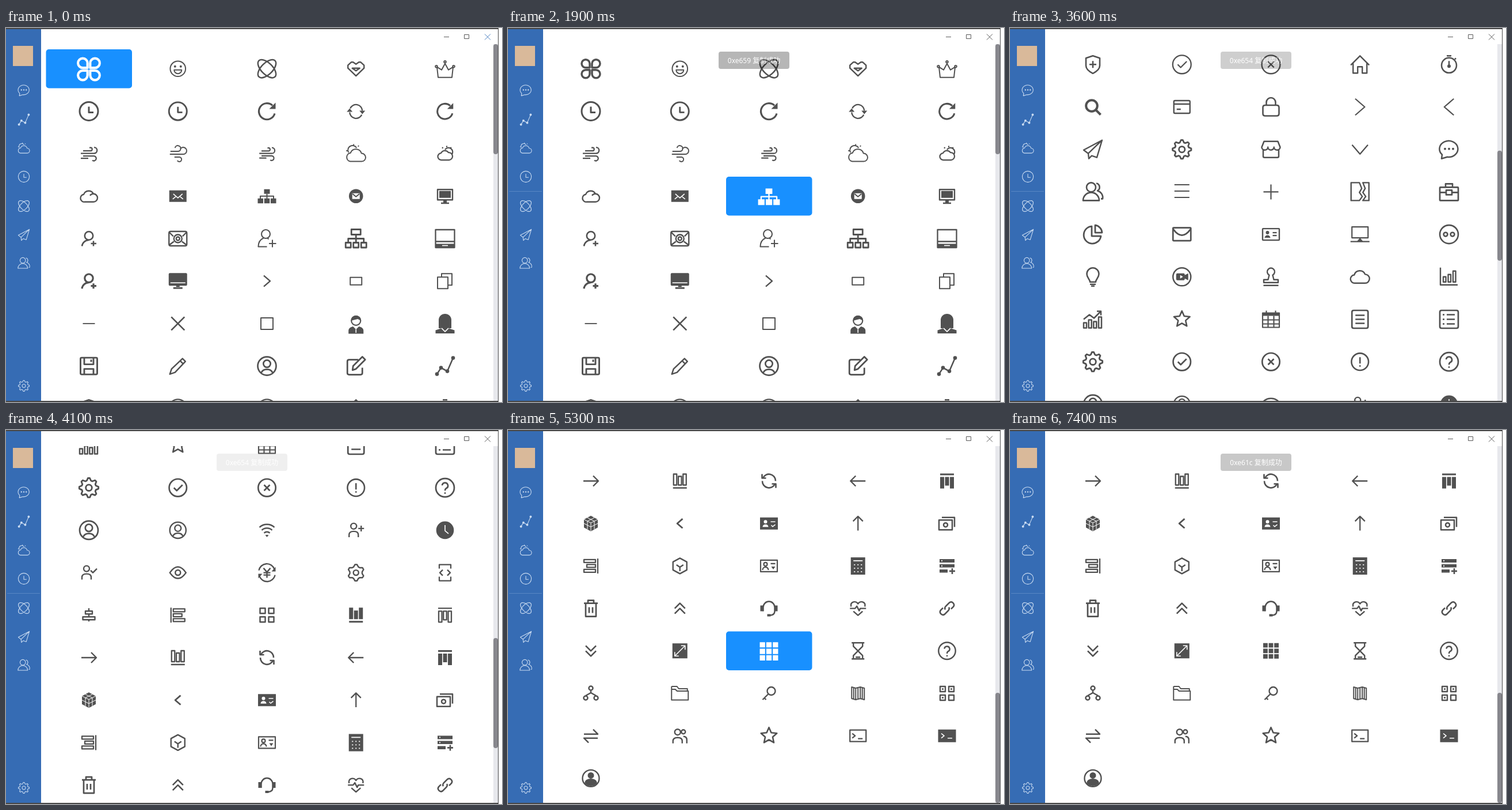
An HTML page that plays this animation: 862x649 px, repeating every 7.5 s.

```html
<!DOCTYPE html>
<html lang="zh">
<head>
<meta charset="utf-8">
<title>Icon browser</title>
<style>
  html, body { margin: 0; width: 100%; height: 100%; overflow: hidden; background: #fff; }
  svg { display: block; width: 862px; height: 649px; }
  .icon { stroke-linejoin: round; color: #515151; }
  .side .icon { color: #c9dbf1; }
  .cell rect { display: none; fill: #1890ff; }
  .cell.on rect { display: block; }
  .cell.on .icon { color: #fff; }
  .cell.on .zoom { transform: translateY(.8px) scale(1.18); }
  text { font: 12px "Noto Sans", "Noto Sans CJK SC", "Noto Sans CJK", sans-serif; }
</style>
</head>
<body>
<svg viewBox="0 0 862 649" xmlns="http://www.w3.org/2000/svg">
  <clipPath id="view"><rect x="61" y="28" width="786" height="619"/></clipPath>
  <g clip-path="url(#view)"><g id="grid"></g></g>
  <rect x="847" y="28" width="8" height="619" fill="#e7e8ec"/>
  <rect id="thumb" x="847" y="28" width="8" height="191" rx="4" fill="#87878d"/>
  <rect y="1" width="61" height="647" fill="#366cb4"/>
  <rect x="12" y="31" width="35" height="35" fill="#d9b99a"/>
  <path id="rule" d="M2 283.5H59" stroke="#5786c4"/>
  <g class="side" id="side"></g>
  <g fill="none" stroke="#5a5a5a">
    <path d="M761 15.5H770M796.5 11.5h8v7h-8z"/>
    <path id="close" d="M832 10.5L842 20.5M842 10.5L832 20.5"/>
  </g>
  <path d="M0 0H856V649H0V647H855V2H0z" fill="#484848"/>
  <g id="toast">
    <rect x="366" y="41" width="123" height="30" rx="4" fill-opacity=".5"/>
    <text id="msg" x="427.5" y="60.5" text-anchor="middle" fill="#fff"></text>
  </g>
</svg>
<script>
const $ = id => document.getElementById(id);

// Path helpers: box with corner radius, circle, polygon from a radius rule
const b = (x, y, w, h, r = 0) => `M${x + r} ${y}h${w - 2 * r}q${r} 0 ${r} ${r}v${h - 2 * r}q0 ${r} ${-r} ${r}` +
  `h${2 * r - w}q${-r} 0 ${-r} ${-r}v${2 * r - h}q0 ${-r} ${r} ${-r}z`;
const c = (r, x = 0, y = 0) => `M${x - r} ${y}a${r} ${r} 0 1 0 ${2 * r} 0a${r} ${r} 0 1 0 ${-2 * r} 0z`;
const poly = (n, radius, shift = 0) => 'M' + Array.from({ length: n }, (_, i) => {
  const a = (i + shift) * 2 * Math.PI / n - Math.PI / 2, r = radius(i);
  return (r * Math.cos(a)).toFixed(2) + ' ' + (r * Math.sin(a)).toFixed(2);
}).join('L') + 'z';
const gear = n => poly(n * 4, i => i % 4 < 2 ? 15.8 : 12, -.5) + c(5);
const nine = [0, 1, 2].map(i => [0, 1, 2].map(j => b(-13.5 + i * 9.6, -13.5 + j * 9.6, 7.8, 7.8)).join('')).join('');
const four = b(-12, -12, 9, 9) + b(3, -12, 9, 9) + b(-12, 3, 9, 9) + b(3, 3, 9, 9);
const smallBody = 'M-12 12V8Q-12 2-4 2Q4 2 4 8V12' + c(5, -4, -7);
const hexa = 'M0-13.5L12-7V7L0 13.5L-12 7V-7Z';
const bust = 'M-11 6A5 4.5 0 0 1-1 6Z' + c(3, -6, -3);

// name: [line width, lines, fill, white lines]
const icons = {
  clover: [3.5, 'M-2-2V-9A7 7 0 1 0-9-2ZM2-2V-9A7 7 0 1 1 9-2ZM-2 2V9A7 7 0 1 1-9 2ZM2 2V9A7 7 0 1 0 9 2Z'],
  smile: [2, c(13.3) + 'M-6.5 2H6.5A6.5 6.5 0 0 1-6.5 2Z', c(2, -5, -4) + c(2, 5, -4)],
  atom: [2.5, 'M-14-14A2 1 45 0 0 14 14A2 1 45 0 0-14-14ZM14-14A2 1-45 0 0-14 14A2 1-45 0 0 14-14Z'],
  heart: [2.4, 'M0 12.5L-14-1V-6L-8-11.5H-5L0-8L5-11.5H8L14-6V-1ZM-6.5-1H6.5L0 3.5Z'],
  crown: [2, 'M-12 15H12L14-3L6 2L0-9L-6 2L-14-3Z' + c(1.8, 0, -12) + c(1.8, -15, -4) + c(1.8, 15, -4)],
  clock: [3, c(16) + 'M0-8V2H8'],
  refresh: [3.2, 'M13.5 4A14 14 0 1 1 9.5-10', 'M15-15V-4H4Z'],
  sync: [2.3, 'M-10-5A11 11 0 0 1 11-1M10 6A11 11 0 0 1-11 2', 'M6-1H16L11 5ZM-6 1H-16L-11-5Z'],
  cycle: [2.6, 'M-10.5-5A11.5 11.5 0 0 1 11.5 0M10.5 5A11.5 11.5 0 0 1-11.5 0M-12-12V-5H-5M12 12V5H5'],
  wind: [2.3, 'M-10-5H4A3 3 0 0 0 4-10.5H1M-14-.5H9A5.2 5.2 0 0 0 9-11M-10 4H9A4.2 4.2 0 1 1 6 11.5M-14 8H-1'],
  gust: [2, 'M-13-4H0A5 5 0 1 0-5-10M-14 1H9A6 6 0 1 0 4-8M-6 6H3A4 4 0 1 1-1 12'],
  sun: [2, 'M-10 13.5A7.5 7.5 0 0 1-9.5-1.3A10 10 0 0 1 9.5-.5A7 7 0 0 1 10 13.5ZM-13-2A8 8 0 0 1 1-10M-4-16.5V-14M-12-13l1.5 1.5M-17-5h2M5-14l-1.5 1.5'],
  sunset: [2.2, 'M-6 11A6 6 0 0 1-7-1A7.5 7.5 0 0 1 6-2A6.5 6.5 0 0 1 7 11ZM0-7A6.5 6.5 0 0 1 12 1M3-13.5V-11M-5-11l1.5 1.5M11-11l-1.5 1.5'],
  cloud: [2.2, 'M-8 10A6.5 6.5 0 0 1-9-3A9 9 0 0 1 8-4A7 7 0 0 1 8 10Z'],
  puff: [2.4, 'M-7 10A6.5 6.5 0 0 1-9-3A9.3 9.3 0 0 1 8-4A7 7 0 0 1 8 10ZM2-1A7 7 0 0 1 8-4'],
  mailFill: [2, '', b(-15, -10, 30, 20), 'M-8-4L0 3L8-4M-9 5L-4 1M9 5L4 1'],
  orgFill: [2, 'M0-4V5M-11.5 5V0H11.5V5', b(-5, -12, 10, 8) + b(-16, 4, 9.5, 8.5) + b(-4.7, 4, 9.5, 8.5) + b(6.5, 4, 9.5, 8.5)],
  mailDot: [2, 'M-6-4L0 1L6-4', c(12.3) + b(-6.5, -5, 13, 10)],
  pc: [2.4, b(-13, -11.5, 26, 18), b(-10, -9, 20, 12) + b(-3, 6, 6, 5) + b(-7, 11, 14, 2.5)],
  addUser: [2.6, c(7.2, 0, -5) + 'M-12 13A12 12 0 0 1 0 2.5M8 4V13M3.5 8.5H13'],
  adder: [2.1, c(7.5, -2, -8) + 'M-6-1Q-15 3-15 14H0M3 1L1-1M9.5 2V15M3.5 8.5H16'],
  mailAt: [2.4, b(-15.5, -12.5, 31, 25, 3) + c(7, 0, 0) + c(3, 0, 0) + 'M-15-11L-8-4M15-11L8-4M-15 11L-7 5M15 11L7 5'],
  org: [2.8, b(-8, -16, 16, 9) + b(-18, 7, 9, 8.5) + b(-4.5, 7, 9, 8.5) + b(9, 7, 9, 8.5) + 'M0-7V7M-13.5 7V0H13.5V7'],
  panel: [2.3, b(-16.5, -15.5, 33, 31) + 'M-16 5H16', b(-16, 9, 32, 7), 'M-5 12H5'],
  pcFill: [2, '', b(-16, -14, 32, 22, 2) + b(-3, 8, 6, 3) + b(-8, 10.5, 16, 3), 'M-13 3H13'],
  chev: [2.4, 'M-5.5-9.5L5.5 0L-5.5 9.5'],
  box: [2, b(-10, -6.5, 20, 13)],
  copy: [2, b(-13, -7, 18, 20) + 'M-6-8V-13H12V7H6'],
  minus: [1.9, 'M-10.5 0H10.5'],
  cross: [2.6, 'M-11.5-11.5L11.5 11.5M11.5-11.5L-11.5 11.5'],
  square: [2, b(-10.5, -10, 21, 20)],
  man: [2.2, c(8, 0, -5), 'M-9-5A9 9 0 0 1 9-5L3-8L-5-6ZM-13 17.5V12C-13 6-5 5-5 5L0 10L5 5C5 5 13 6 13 12V17.5Z', 'M0 10V16'],
  woman: [1, '', 'M-11 8V-6A11 11 0 0 1 11-6V8ZM-16.5 17V11.5L-6 8H6L16.5 11.5V17Z', 'M-6 8L0 14L6 8'],
  save: [2.9, b(-14.5, -14.5, 29, 29, 2) + 'M-8-14V-3H8V-14M-8 14V5H8V14M4-11V-7'],
  pencil: [2.5, 'M-14 14L-11 5L8-13L13-8L-5 11ZM4-9L9-4'],
  user: [2.7, c(16) + c(6.2, 0, -4) + 'M-10 12A10.5 9 0 0 1 10 12'],
  edit: [2.8, 'M4-11H-12Q-15-11-15-8V12Q-15 15-12 15H8Q11 15 11 12V3M-6 7L-5 0L11-16L16-11L0 5Z'],
  line: [2.5, 'M-14 14L-7 3L4 9L14-14', c(3.3, -14, 14) + c(3.3, -7, 3) + c(3.3, 4, 9) + c(3.3, 14, -14)],
  shield: [2.6, 'M0-15L12-11V2C12 8 5 13 0 15.5C-5 13-12 8-12 2V-11ZM0-6V6M-6 0H6'],
  check: [2.7, c(15.2) + 'M-7 0L-2 5L8-5'],
  wrong: [2.7, c(15.2) + 'M-5-5L5 5M5-5L-5 5'],
  home: [2.4, 'M-16 1L0-15L16 1M-12-2V15H-4V4H4V15H12V-2'],
  timer: [2.5, c(13, 0, 1.5) + 'M-4-15H4M0-6V3M10-9l2-2', c(3, 0, 3)],
  search: [4, c(9.8, -2, -2) + 'M5 5L13.5 13.5'],
  card: [2.4, b(-14, -11, 28, 22, 2) + 'M-14-5H14M-9 4H-2'],
  lock: [2.6, b(-14, -3, 28, 18.5, 4) + 'M-8-3V-8A8 8 0 0 1 8-8V-3'],
  send: [2.4, 'M16-16L-16 1L-8 7L-7 16L-2 11L7 14ZM16-16L-8 7'],
  gear: [2.7, gear(8)],
  nut: [2.7, gear(6)],
  shop: [2.5, 'M-13.5 1V12Q-13.5 14-11 14H11Q13.5 14 13.5 12V1M-12-14H12L16-4A5.3 5 0 0 1 5.3-4A5.3 5 0 0 1-5.3-4A5.3 5 0 0 1-16-4Z'],
  chat: [2.5, 'M-13 16L-12 9A16 14 0 1 1-3 13Z', c(2, -7, -1) + c(2, 0, -1) + c(2, 7, -1)],
  users: [2.6, c(8, -3, -8) + 'M-17 15A14 14 0 0 1 11 15ZM6-15A7 7 0 0 1 8-2A12 12 0 0 1 17 12H14'],
  menu: [2, 'M-13-12.5H13M-13-1.5H13M-13 9.5H13'],
  plus: [2.2, 'M-13 0H13M0-13V13'],
  ticket: [2.4, 'M-1-16H-15.5V15H-1L4 8L-1 1L3-6ZM5-16H15.5V15H5L10 8L5 1L9-6Z'],
  bag: [2.7, b(-16, -8, 32, 23, 1) + b(-5, -3, 10, 8) + 'M-6-8V-14H6V-8M-16 1H-5M5 1H16'],
  pie: [2.8, 'M-2-14A15 15 0 1 0 14 3H-2ZM4-16V-3H16A14 14 0 0 0 4-16Z'],
  mail: [2.7, b(-15.5, -11.5, 31, 22.5, 1) + 'M-15-9Q0 12 15-9'],
  id: [2.4, b(-14.5, -10, 29, 20, 1) + 'M3-3H10M3 2H10', bust],
  desk: [2.2, b(-14, -13, 28, 19) + 'M-16.5 12.5H16.5', 'M-5 12L0 6L5 12Z'],
  face: [2.6, c(16) + c(3.4, -6) + c(3.4, 6)],
  bulb: [2.6, 'M-5 9C-5 4-10.5 2-10.5-5A10.5 10.5 0 0 1 10.5-5C10.5 2 5 4 5 9ZM-5 13H5M-3 16H3'],
  video: [2.5, c(15.5), 'M-8-6H3Q5-6 5-3L11-6V6L5 3Q5 6 3 6H-8Q-10 6-10 3V-3Q-10-6-8-6ZM-3-3V3L2 0Z'],
  stamp: [2.4, 'M-3-3A6.5 6.5 0 1 1 3-3L5 5H12.5V10H-12.5V5H-5ZM-13 15H13'],
  bars: [2.4, 'M-15-16V14H15' + b(-10, 0, 4.5, 9) + b(-1.5, -4, 4.5, 13) + b(7, -10, 4.5, 19)],
  trend: [2.5, b(-16, 6, 5, 9) + b(-7.3, 1, 5, 14) + b(1.3, 4, 5, 11) + b(10, -4, 5, 19) + 'M-16 0L-6-8L2-2L14-14M7-14H14V-7'],
  star: [2.6, poly(10, i => i % 2 ? 6.8 : 14.5)],
  date: [2.2, b(-14.5, -11, 29, 25) + 'M-14 1H14M-14 8H14M-5-6V14M5-6V14M-8-15V-9M8-15V-9', b(-15, -11, 30, 5)],
  doc: [2.7, b(-14, -15.5, 28, 31, 3) + 'M-8-7H8M-8 0H8M-8 7H8'],
  list: [2.7, b(-16, -15.5, 32, 31, 3) + 'M-4-8H10M-4 0H10M-4 8H10M-11-8H-8M-11 0H-8M-11 8H-8'],
  alert: [2.6, c(14.8) + 'M0-8V3M0 6V8.5'],
  ask: [2.7, c(16) + 'M-5-4A5 5 0 1 1 2 1Q0 2 0 5M0 8V10.5'],
  wifi: [2.4, 'M-13-5A19 19 0 0 1 13-5M-9 0A13 13 0 0 1 9 0M-5 5A7 7 0 0 1 5 5', 'M-3 8H3L0 12Z'],
  join: [2.4, smallBody + 'M9-8V2M4-3H14'],
  clockFill: [2, '', c(15.3), 'M0-9V1L6 6'],
  verify: [2.4, smallBody + 'M3-4L7 0L14-7'],
  eye: [2.5, 'M-14 0Q0-20 14 0Q0 20-14 0Z' + c(4.5)],
  yen: [2.4, 'M-14-4A14 14 0 0 1 13-6M14 4A14 14 0 0 1-13 6M-6-8L0-1L6-8M0-1V9M-6 0H6M-6 4H6', 'M15-10V-2H8ZM-15 10V2H-8Z'],
  code: [2.3, 'M-10-7V-14H10V-7M-10 7V14H10V7M-4-5L-9 0L-4 5M4-5L9 0L4 5'],
  middle: [2.4, b(-6, -7, 12, 5) + b(-10.5, 3, 21, 5) + 'M0-12V-7M0-2V3M0 8V11'],
  left: [2.3, b(-8, -11, 20, 5) + b(-8, -2.5, 15, 5) + b(-8, 6, 20, 5) + 'M-12-13V13'],
  four: [2.5, four],
  colsFill: [2, '', b(-12, -13, 7, 20) + b(-3.5, -8, 7, 15) + b(5, -13, 7, 20) + b(-12, 10, 24, 3)],
  cols: [2.3, b(-11, -12, 5.5, 19) + b(-2.7, -8, 5.5, 15) + b(5.5, -12, 5.5, 19) + 'M-12 12H12'],
  arrow: [2.4, 'M-13 0H13M4-9L13 0L4 9'],
  cubes: [1, '', hexa, 'M-12-7L0-1L12-7M0-1V13M-6-10L6-4V10M6-10L-6-4V10M-12 0L0 6L12 0'],
  idFill: [2, '', b(-15.5, -10.5, 31, 21) + bust, 'M3-3H11M4 3l2.5 2.5L11 2'],
  money: [2.5, b(-14, -6, 23, 17) + c(3.5, -2.5, 2.5) + 'M-9-10.5H13V6'],
  cube: [2.4, hexa + 'M0 2V9M0 2L-6-2M0 2L6-2'],
  idBeat: [2.2, b(-14.5, -10, 29, 20) + c(3, -6, -3) + 'M-11 7A5 5 0 0 1-1 7M3-4H11', 'M4 1H11L7.5 6Z'],
  calc: [2, '', b(-12.5, -15, 25, 30), 'M-8-9H8' + [-2, 4, 10].map(y => `M-7 ${y}h2M-1 ${y}h2M5 ${y}h2`).join('')],
  server: [2.6, 'M9 4V14M4 9H14', b(-13, -12, 26, 6) + b(-13, -3, 26, 5.5) + b(-13, 6, 14, 5.5), 'M-10-9h2M-10 0h2'],
  trash: [2.7, b(-9, -9, 18, 23) + 'M-12-9H12M-5-9V-14H5V-9M-3-2V8M3-2V8'],
  up: [2.6, 'M-9 0L0-9L9 0M-9 9L0 0L9 9'],
  headset: [2.5, 'M-10 5V-2A10 10 0 0 1 10-2V5Q10 12 1 12', b(-15, -5, 5, 10) + b(10, -5, 5, 10) + b(-3, 10, 6, 4)],
  beat: [2.4, 'M-12-3C-14-12-3-14 0-8C3-14 14-12 12-3M-14 0H-5L-2-4L2 4L4 0H14M-8 5L0 12L8 5'],
  link: [2.6, 'M-3 2Q-5-1-2-4L4-10A5 5 0 0 1 11-3L7 1M3-2Q5 1 2 4L-4 10A5 5 0 0 1-11 3L-7-1'],
  expand: [2, '', b(-13, -13, 26, 26), 'M-9 9L9-9M2-9H9V-2M-9 2V9H-2'],
  nine: [1, '', nine],
  glass: [2.4, 'M-11-14H11M-11 14H11M-8-14V-8L0 0L-8 8V14M8-14V-8L0 0L8 8V14M-4 11H4'],
  tree: [2.5, c(3.5, 0, -9) + c(3.5, -9, 8) + c(3.5, 9, 8) + 'M0-5V0M-9 4L0-1L9 4'],
  folder: [2, 'M-14.5-12H-5L-2-8H13V-4M-14.5-12V11.5H14.5V-4H-5L-8-7H-14.5'],
  key: [2.4, c(7, 4, -4) + 'M-1 1L-11 11M-8 8l3 3'],
  map: [2, 'M-11-11L-4-9L4-11L11-9V11L4 9L-4 11L-11 9ZM-4-9V11M4-11V9M-7.5-10V10M0-10V10M7.5-10V10'],
  blocks: [2.4, four + 'M-9-7.5h3M6-7.5h3M-9 7.5h3'],
  swap: [2.4, 'M-12-3H12L4-11M12 4H-12L-4 12'],
  pair: [2.4, c(5, -4, -6.5) + c(3.5, 6, -7) + 'M-12 13V9Q-12 3-4 3Q4 3 4 9V13M6 1Q12 1 12 7V13'],
  term: [2.3, b(-14, -10, 28, 20) + 'M-10-4L-5 0L-10 4M0 5H8'],
  termFill: [2, '', b(-15.5, -11, 31, 22), 'M-10-4L-5 0L-10 4M1 4H9'],
  userFill: [2.4, c(14.5), c(5.5, 0, -5) + 'M-11 8A11 7.5 0 0 1 11 8A13.6 13.6 0 0 1-11 8Z']
};

// Each entry: name/scale/line width on screen/rotation
const rows = `clover smile atom heart crown
clock clock/.97 refresh sync refresh/.95
wind gust wind/.95 sun sunset
puff mailFill orgFill mailDot pc
addUser mailAt adder org panel
addUser//3.2 pcFill chev box copy
minus cross square man woman
save pencil user edit line
shield check/1.05/2.3 wrong/1.05/2.3 home timer
search card lock chev/1.5/2.2 chev/1.5/2.2/180
send gear/1.03 shop chev/1.45/2.3/90 chat
users menu plus ticket bag
pie mail id desk face
bulb video stamp cloud/1.1 bars
trend star date doc list
gear/1.06 check wrong alert ask
user user/.88 wifi join clockFill
verify eye yen nut/.9 code
middle left four colsFill cols///180
arrow cols cycle arrow///180 colsFill///180
cubes chev/.85/2.8/180 idFill arrow/.95//-90 money
left///180 cube idBeat calc server
trash up headset beat link
up///180 expand nine glass ask/.92
tree folder key map blocks
swap pair star term termFill
userFill`.split('\n').map(r => r.split(' '));

function draw(token) {
  const [name, size, width, turn] = token.split('/');
  const [w, lines, fill = '', cut = ''] = icons[name];
  const s = +size || 1;
  return `<g class="icon" transform="rotate(${turn || 0}) scale(${s})" fill="none">
    <path d="${fill}" fill="currentColor" fill-rule="evenodd"/>
    <path d="${lines}" stroke="currentColor" stroke-width="${width ? width / s : w}"/>
    <path d="${cut}" stroke="#fff" stroke-width="${name === 'cubes' ? 1 : 1.6}"/></g>`;
}

$('grid').innerHTML = rows.map((row, r) => row.map((token, k) =>
  `<g class="cell" id="c${r}-${k}" transform="translate(${144 + k * 154.75} ${70.7 + r * 73.7})">
    <rect x="-74.5" y="-33.7" width="149.5" height="67.4" rx="5"/><g class="zoom">${draw(token)}</g></g>`
).join('')).join('');

const menu = { chat: 108, line: 159, sun: 209, clock: 258, atom: 309, send: 359, users: 408, gear: 621 };
$('side').innerHTML = Object.entries(menu).map(([name, y]) =>
  `<g transform="translate(31 ${y})">${draw(name + '/.6/1.1')}</g>`).join('');

const LOOP = 7500, FADE = 1900, MAX = 1382.5;
const scrollKeys = [[2900, 0], [3600, 597], [4100, 1076], [4500, MAX]];
const hovers = [['c0-0', 0, 1900], ['c3-2', 1900, 2900], ['c23-2', 4700, 6900]];
const toasts = [[1080, '0xe659'], [2430, '0xe654'], [6320, '0xe61c']];

function scrollAt(t) {
  let [t0, y0] = scrollKeys[0];
  for (const [t1, y1] of scrollKeys) {
    if (t < t1) return t1 === t0 ? y0 : y0 + (y1 - y0) * (t - t0) / (t1 - t0);
    [t0, y0] = [t1, y1];
  }
  return MAX;
}

function show(t) {
  const y = scrollAt(t);
  $('grid').setAttribute('transform', `translate(0 ${-y})`);
  $('thumb').setAttribute('y', 28 + y / MAX * 428);
  for (const [id, from, to] of hovers) $(id).classList.toggle('on', t >= from && t < to);
  const last = toasts.filter(([start]) => start <= t).pop();
  $('toast').setAttribute('opacity', last ? Math.max(0, 1 - (t - last[0]) / FADE) : 0);
  $('msg').textContent = last ? last[1] + ' 复制成功' : '';
  $('rule').setAttribute('opacity', t < 100 ? 0 : 1);
  $('close').setAttribute('stroke', t < 100 ? '#4a7fc0' : '#5a5a5a');
}

// The picture advances in 100 ms steps
const start = performance.now();
function tick(now) {
  show(Math.floor(Math.max(0, now - start) % LOOP / 100) * 100);
  requestAnimationFrame(tick);
}
show(0);
requestAnimationFrame(tick);
</script>
</body>
</html>
```
